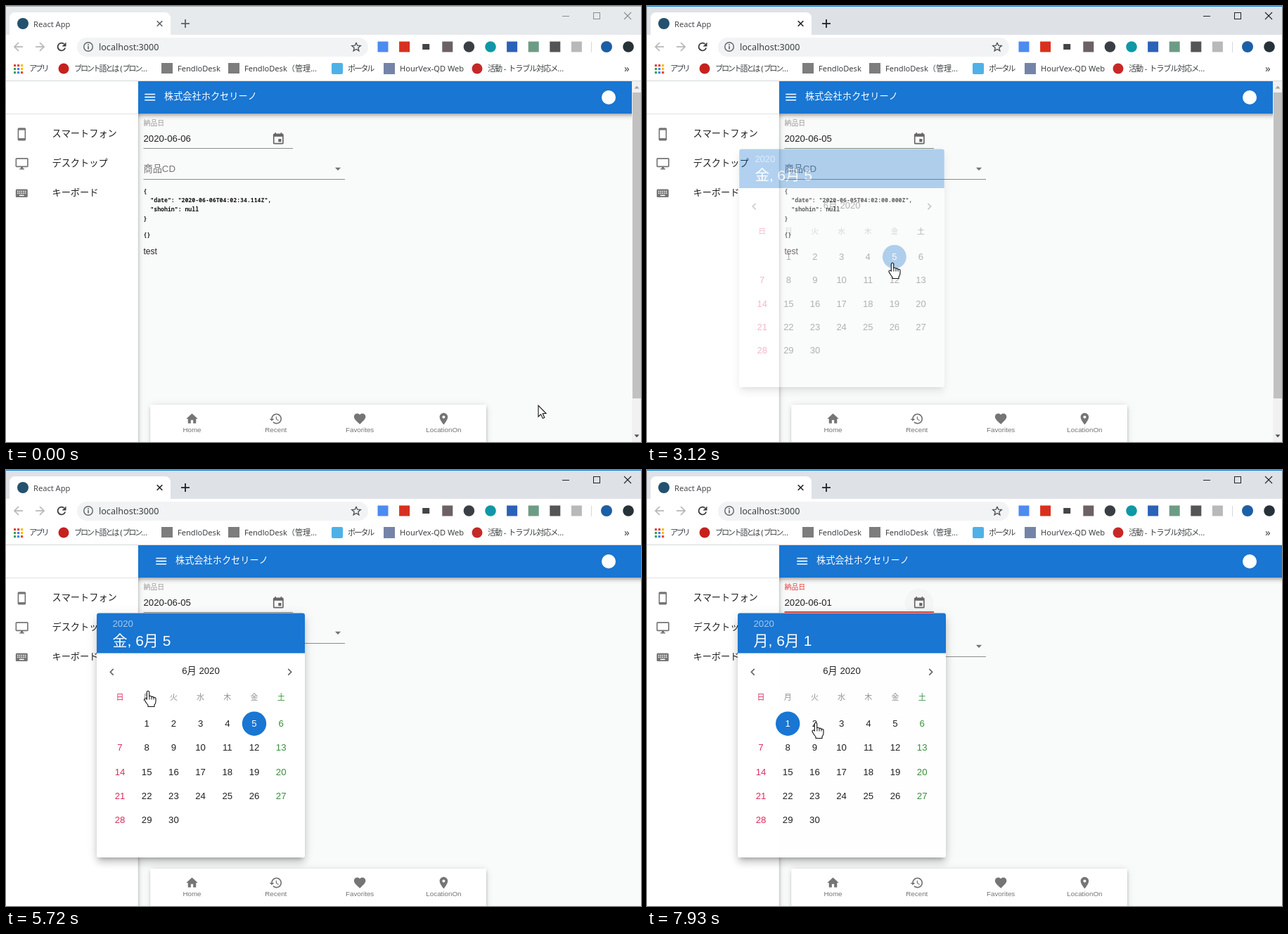
An HTML page with a canvas for the animation above (7990 ms loop, 903 by 620 pixels).

```html
<!DOCTYPE html>
<html lang="ja">
<head>
<meta charset="utf-8">
<title>React App</title>
<style>
html, body { margin: 0; width: 100%; height: 100%; overflow: hidden; background: #fff; }
canvas { display: block; }
</style>
</head>
<body>
<canvas id="stage" width="903" height="620"></canvas>
<script>
const LOOP = 7990, W = 903, H = 620, FADE = 324;
const CJK = '"Noto Sans CJK JP", "Noto Sans CJK", sans-serif';
const SANS = '"Liberation Sans", ' + CJK;
const UI = '"Noto Sans", ' + CJK;
const MONO = '"Noto Sans Mono", monospace';
const BLUE = '#1976d2', GREEN = '#388e3c', RED = '#e53935', PINK = '#dc2c5c';
const INK = '#212121', GRAY = '#757575';

// shadow layers: offset, blur, inset, alpha
const LOW = [[2, 4, 1, 0.2], [4, 5, 0, 0.14], [1, 10, 0, 0.12]];
const HIGH = [[5, 5, 3, 0.2], [8, 11, 0, 0.14], [3, 16, 0, 0.12]];

const stage = document.getElementById('stage').getContext('2d');
const sheet = document.createElement('canvas');
sheet.width = W;
sheet.height = H;
const layer = sheet.getContext('2d');
let g = stage;

const ICONS = {
  phone: 'M17 1H7c-1.1 0-2 .9-2 2v18c0 1.1.9 2 2 2h10c1.1 0 2-.9 2-2V3c0-1.1-.9-2-2-2zM17 19H7V5h10v14z',
  desktop: 'M21 2H3c-1.1 0-2 .9-2 2v12c0 1.1.9 2 2 2h7v2H8v2h8v-2h-2v-2h7c1.1 0 2-.9 2-2V4c0-1.1-.9-2-2-2zm0 14H3V4h18v12z',
  event: 'M17 12h-5v5h5v-5zM16 1v2H8V1H6v2H5c-1.1 0-2 .9-2 2v14c0 1.1.9 2 2 2h14c1.1 0 2-.9 2-2V5c0-1.1-.9-2-2-2h-1V1h-2zm3 18H5V8h14v11z',
  home: 'M10 20v-6h4v6h5v-8h3L12 3 2 12h3v8z',
  recent: 'M13 3c-4.97 0-9 4.03-9 9H1l3.9 3.9L9 12H6c0-3.87 3.13-7 7-7s7 3.13 7 7-3.13 7-7 7c-1.93 0-3.68-.79-4.94-2.06l-1.42 1.42C8.27 20 10.5 21 13 21c4.97 0 9-4.03 9-9s-4.03-9-9-9zm-1 5v5l4.28 2.54.72-1.21-3.5-2.08V8H12z',
  heart: 'M12 21.35l-1.45-1.32C5.4 15.36 2 12.28 2 8.5 2 5.42 4.42 3 7.5 3c1.74 0 3.41.81 4.5 2.09C13.09 3.81 14.76 3 16.5 3 19.58 3 22 5.42 22 8.5c0 3.78-3.4 6.86-8.55 11.54L12 21.35z',
  pin: 'M12 2C8.13 2 5 5.13 5 9c0 5.25 7 13 7 13s7-7.75 7-13c0-3.87-3.13-7-7-7zm0 9.5a2.5 2.5 0 1 1 0-5 2.5 2.5 0 0 1 0 5z',
  menu: 'M3 18h18v-2H3v2zm0-5h18v-2H3v2zm0-7v2h18V6H3z',
  drop: 'M7 10l5 5 5-5z',
  left: 'M15.4 7.4L14 6l-6 6 6 6 1.4-1.4L10.8 12z',
  right: 'M10 6L8.6 7.4 13.2 12l-4.6 4.6L10 18l6-6z'
};
for (const k in ICONS) ICONS[k] = new Path2D(ICONS[k]);

const ARROW = new Path2D('M0 0V16L3.6 12.6 6.3 18.4 8.8 17.3 6.2 11.7 11 11.4z');
const HAND = new Path2D('M-1.7 12V1.5Q0 -1 1.7 1.5V8Q3.6 6.4 5 8.5 7 7.4 8 9.5 10.4 8.6 11 11V15Q11 18 9 20V22.5H0V20.5Q-3 17-5 13-5.4 10.6-3 11z');

// time, x, y of the pointer tip
const TRACK = [
  [70, 757, 568], [550, 386, 185], [1020, 386, 186], [1180, 398, 214], [1560, 300, 320],
  [1640, 300, 320], [2120, 172, 404], [2420, 182, 402], [2500, 182, 402], [2760, 349, 365],
  [3520, 349, 365], [3840, 250, 190], [3980, 250, 190], [4300, 385, 186], [4620, 385, 186],
  [4860, 262, 276], [5260, 202, 304], [5340, 202, 304], [5480, 202, 314], [5720, 202, 314],
  [5960, 201, 364], [6180, 201, 364], [6420, 325, 277], [6740, 394, 220], [6900, 394, 220],
  [7060, 386, 183], [7620, 386, 184], [7930, 240, 359]
];
const HAND_TIMES = [[520, 1090], [1600, 3560], [4260, 4650], [4990, 6560], [7040, 7680], [7850, LOOP]];
const DIALOGS = [[1043, 2982], [4633, 6440], [7640, 99999]];

const clamp = v => Math.max(0, Math.min(1, v));
const mix = (a, b, p) => a + (b - a) * p;
const within = (t, spans) => spans.some(([a, b]) => t >= a && t < b);

// cubic-bezier(.4, 0, .2, 1)
function ease(x) {
  x = clamp(x);
  let lo = 0, hi = 1, u = x;
  for (let i = 0; i < 20; i++) {
    u = (lo + hi) / 2;
    const v = 1.2 * u * (1 - u) ** 2 + 0.6 * u * u * (1 - u) + u ** 3;
    if (v < x) lo = u; else hi = u;
  }
  return 3 * u * u * (1 - u) + u ** 3;
}

function rect(x, y, w, h, color, r = 0) {
  g.fillStyle = color;
  g.beginPath();
  g.roundRect(x, y, w, h, r);
  g.fill();
}

function disc(x, y, r, color) {
  g.fillStyle = color;
  g.beginPath();
  g.arc(x, y, r, 0, 7);
  g.fill();
}

function line(points, color, width = 1) {
  g.strokeStyle = color;
  g.lineWidth = width;
  g.beginPath();
  points.forEach(([x, y], i) => i ? g.lineTo(x, y) : g.moveTo(x, y));
  g.stroke();
}

function cross(x, y, r, color, width) {
  line([[x - r, y - r], [x + r, y + r]], color, width);
  line([[x - r, y + r], [x + r, y - r]], color, width);
}

function text(s, x, y, size, family, color, { align = 'left', weight = 400, gap = 0 } = {}) {
  g.font = `${weight} ${size}px ${family}`;
  g.fillStyle = color;
  g.textAlign = align;
  g.letterSpacing = gap + 'px';
  g.fillText(s, x, y);
}

function icon(name, x, y, color = GRAY) {
  g.save();
  g.translate(x, y);
  g.scale(0.825, 0.825);
  g.translate(-12, -12);
  g.fillStyle = color;
  g.fill(ICONS[name], 'evenodd');
  g.restore();
}

function raised(x, y, w, h, color, shadows, r = 0) {
  g.save();
  for (const [dy, blur, inset, alpha] of shadows) {
    g.shadowColor = `rgba(0,0,0,${alpha})`;
    g.shadowBlur = blur;
    g.shadowOffsetY = dy;
    rect(x + inset, y + inset, w - 2 * inset, h - 2 * inset, color, r);
  }
  g.restore();
  rect(x, y, w, h, color, r);
}

function tabStrip(active) {
  const ctl = active ? '#222' : '#8c8c8c', ink = active ? '#222' : '#5f6368';
  rect(0, 0, W, 41, active ? '#dee1e6' : '#e7eaed');
  rect(0, 0, W, 1, active ? '#1883d7' : '#aaa');
  rect(5, 9, 229, 33, '#fff', [8, 8, 0, 0]);
  disc(24, 25, 8, '#24516f');
  text('React App', 39, 30, 11.1, UI, '#45494d');
  cross(218.5, 25, 3.8, ink, 1.6);
  line([[249, 25], [261, 25]], ink, 1.8);
  line([[255, 19], [255, 31]], ink, 1.8);
  line([[791, 14.5], [801, 14.5]], ctl);
  g.strokeRect(835.5, 9.5, 9, 9);
  cross(884, 14, 5, ctl, 1.1);
}

function arrowButton(x, dir) {
  line([[x - 6 * dir, 58], [x + 6 * dir, 58]], '#b4b6b9', 1.7);
  line([[x, 52], [x + 6 * dir, 58], [x, 64]], '#b4b6b9', 1.7);
}

function toolbar() {
  rect(0, 41, W, 66, '#fff');
  arrowButton(18, -1);
  arrowButton(48, 1);
  g.strokeStyle = '#3c4043';
  g.lineWidth = 1.8;
  g.beginPath();
  g.arc(79, 58, 5.4, 0.3, 5.4);
  g.stroke();
  g.fillStyle = '#3c4043';
  g.fill(new Path2D('M85.5 51.5v6h-6z'));

  rect(101, 45, 414, 27, '#f1f3f4', 13.5);
  g.strokeStyle = '#5f6368';
  g.lineWidth = 1.4;
  g.beginPath();
  g.arc(117, 58, 6.3, 0, 7);
  g.stroke();
  rect(116.2, 57, 1.6, 4.5, '#5f6368');
  rect(116.2, 54.3, 1.6, 1.6, '#5f6368');
  text('localhost:3000', 132, 63, 12.6, UI, '#3c4043');

  const star = [];
  for (let i = 0; i <= 10; i++) {
    const a = i * Math.PI / 5 - Math.PI / 2, r = i % 2 ? 2.9 : 6.6;
    star.push([498 + r * Math.cos(a), 58.5 + r * Math.sin(a)]);
  }
  line(star, '#4a4d51', 1.3);

  const colors = ['#4c8bf0', '#d8301e', '#444', '#6c6163', '#3a3f44', '#0f97a7', '#2a62b8', '#6d9c86', '#555', '#b9b9b9'];
  const round = [4, 5];
  colors.forEach((c, i) => {
    const x = 536 + i * 30.6;
    if (round.includes(i)) disc(x, 58, 7.8, c);
    else if (i === 2) rect(x - 5, 54, 10, 8, c);
    else rect(x - 7.5, 50.5, 15, 15, c);
  });
  rect(832, 51, 1, 15, '#d5d7da');
  disc(854, 58, 8, '#1c5fa8');
  disc(885, 58, 7.8, '#263238');
}

// Letter gaps apply to Japanese runs only.
function mark(s, x, gap = 0) {
  for (const run of s.match(/[ -~]+|[^ -~]+/g)) {
    text(run, x, 93, 11.1, UI, '#3c4043', { gap: run > '~' ? gap : 0 });
    x += g.measureText(run).width;
  }
}

function bookmarks() {
  const dots = ['#ea4335', '#ea4335', '#fbbc04', '#34a853', '#4285f4', '#fbbc04', '#34a853', '#4285f4', '#ea4335'];
  dots.forEach((c, i) => rect(11 + i % 3 * 5, 83 + Math.floor(i / 3) * 5, 3.2, 3.2, c));
  mark('アプリ', 33, -2.4);
  disc(82, 89, 7.5, '#c5221f');
  mark('ブロント語とは (ブロン...', 97, -2.2);
  rect(221, 81, 16, 15, '#7d7d7d');
  mark('FendloDesk', 244);
  rect(316, 81, 16, 15, '#7d7d7d');
  mark('FendloDesk（管理...', 339);
  rect(463, 81, 16, 16, '#4db1e8', 2);
  mark('ポータル', 486, -2);
  rect(537, 81, 16, 16, '#7583a8');
  mark('HourVex-QD Web', 560);
  disc(670, 89, 7.5, '#c62828');
  mark('活動 - トラブル対応メ...', 685, -1.1);
  text('»', 879, 94, 15, UI, '#3c4043');
  rect(0, 106, W, 1, '#d5d7da');
}

function sidebar() {
  raised(0, 100, 187.5, 530, '#fff', LOW);
  rect(0, 153, 187, 1, '#e0e0e0');
  icon('phone', 22.4, 182.3);
  icon('desktop', 22.6, 224.3);
  rect(13.8, 260.5, 17, 11.5, GRAY, 1.5);
  for (let r = 0; r < 2; r++)
    for (let c = 0; c < 5; c++) rect(16 + c * 2.7, 262.8 + r * 2.6, 1.5, 1.5, '#fff');
  rect(19, 268.6, 6.6, 1.5, '#fff');
  ['スマートフォン', 'デスクトップ', 'キーボード'].forEach((s, i) =>
    text(s, 65.5, 186 + i * 42, 13.2, CJK, INK));
}

function appBar(modal) {
  const dx = modal ? 16 : 0;
  g.save();
  g.beginPath();
  g.rect(188, 107, W, 80);
  g.clip();
  raised(180, 100, W, 53, BLUE, LOW);
  g.restore();
  icon('menu', 204.7 + dx, 129.6, '#fff');
  text('株式会社ホクセリーノ', 225 + dx, 133, 13.2, CJK, '#fff', { weight: 500 });
  disc(857, 130, 10, '#fff');
}

function underline(x2, y, state) {
  const [color, h] = { error: ['#f44336', 2], hover: [INK, 2], idle: ['#8d8d8d', 1] }[state];
  rect(195.5, h > 1 ? y - 1 : y, x2 - 195.5, h, color);
}

function ripple(t) {
  for (const [a] of DIALOGS) {
    const d = t - a;
    if (d < -190 || d > 330) continue;
    const alpha = 0.12 * (1 - clamp((d - 140) / 180));
    disc(387, 189, 20.5 * ease((d + 190) / 220), `rgba(0,0,0,${alpha})`);
  }
}

function form(t, day, modal, [mx, my]) {
  const bad = day === 1, dy = bad ? 19 : 0;
  const over = (x2, y1, y2) => !modal && mx > 195 && mx < x2 && my > y1 && my < y2;
  const date = `2020-06-0${day}`;
  ripple(t);
  text('納品日', 195.5, 170, 9.9, CJK, bad ? RED : '#999');
  text(date, 195.5, 193, 13.2, SANS, INK);
  icon('event', 387.3, 189, '#666');
  underline(408, 202, bad ? 'error' : over(408, 174, 203) ? 'hover' : 'idle');
  if (bad) text('日付が不正です', 195.5, 215, 9.9, CJK, RED);

  text('商品CD', 195.5, 236 + dy, 13.2, SANS, GRAY);
  icon('drop', 472, 231.5 + dy);
  underline(482, 246 + dy, over(482, 222 + dy, 247 + dy) ? 'hover' : 'idle');

  const time = day === 6 ? '04:02:34.114Z' : '04:02:00.000Z';
  const code = (lines, y) => lines.forEach((s, i) =>
    text(s, 195.5, Math.round(y + i * 13.3) + dy, 8.2, MONO, '#111', { weight: 600 }));
  code(['{', `  "date": "${date}T${time}",`, '  "shohin": null', '}'], 265.5);
  code(bad ? ['{', '  "date": "日付が不正です"', '}'] : ['{}'], 328);
  text('test', 195.5, 353 + dy + (bad ? 27 : 0), 12, SANS, INK);
}

function bottomNav() {
  raised(205.5, 567, 477.5, 60, '#fff', LOW);
  [['home', 'Home'], ['recent', 'Recent'], ['heart', 'Favorites'], ['pin', 'LocationOn']].forEach(([name, s], i) => {
    const x = 264.5 + i * 119.3;
    icon(name, x, 587);
    text(s, x, 606, 9.8, SANS, GRAY, { align: 'center' });
  });
}

function scrollbar() {
  rect(890, 107, 13, 513, '#f1f1f1');
  rect(891, 123, 12, 435, '#c1c1c1');
  g.fillStyle = '#a3a3a3';
  g.fill(new Path2D('M893.5 117.5l3.5-4 3.5 4z'));
  g.fillStyle = '#505050';
  g.fill(new Path2D('M893.5 609.5l3.5 4 3.5-4z'));
}

function calendar(t, day, closing) {
  const names = '日月火水木金土';
  const tone = col => col === 0 ? PINK : col === 6 && !closing ? GREEN : INK;
  const main = day === 6 ? GREEN : BLUE;
  const colX = c => 162 + c * 38.2;
  raised(129, 203.5, 296, 347.5, '#fff', HIGH, 3.3);
  rect(129, 203.5, 296, 57, main, [3.3, 3.3, 0, 0]);
  text('2020', 151.5, 223, 13.2, SANS, 'rgba(255,255,255,.6)');
  text(`${names[day % 7]}, 6月 ${day}`, 151.5, 249.5, 21, SANS, '#fff', { weight: 500 });
  text('6月 2020', 277, 290, 13.2, SANS, INK, { align: 'center' });
  icon('left', 150.5, 287.3, '#666');
  icon('right', 403.5, 287.3, '#666');
  [...names].forEach((s, c) => {
    const edge = c % 6 === 0;
    text(s, colX(c), 327, 11, CJK, edge ? tone(c) : '#929292', { align: 'center', weight: edge ? 500 : 400 });
  });
  for (let d = 1; d <= 30; d++) {
    const x = colX(d % 7), y = 360.7 + Math.floor(d / 7) * 34.3;
    if (d === day) disc(x, y, 17.2, main);
    const pressed = d === 5 ? t - 2800 : d === 1 ? t - 6170 : -1;
    if (d !== day && pressed > 0 && pressed < 300)
      disc(x, y, 16 * ease(pressed / 200), 'rgba(0,0,0,.28)');
    text(d, x, Math.round(y + 4.4), 13.2, SANS, d === day ? '#fff' : tone(d % 7), { align: 'center' });
  }
}

function dialog(t, day) {
  const span = DIALOGS.find(([a, b]) => t >= a && t < b + FADE);
  if (!span) return;
  const p = (t - span[0]) / FADE, q = (t - span[1]) / FADE;
  const closing = q > 0;
  const alpha = closing ? 1 - ease(q) : ease(p);
  const grown = closing ? 1 - ease((q - 0.333) / 0.666) : ease(p / 0.666);
  g = layer;
  g.clearRect(0, 0, W, H);
  g.save();
  g.translate(277, 203.5);
  g.scale(mix(0.75, 1, grown), mix(0.5625, 1, grown));
  g.translate(-277, -203.5);
  calendar(t, day, closing);
  g.restore();
  g = stage;
  g.globalAlpha = alpha;
  g.drawImage(sheet, 0, 0);
  g.globalAlpha = 1;
}

function pointerAt(t) {
  const i = TRACK.findIndex(k => k[0] > t);
  if (i === 0) return TRACK[0].slice(1);
  if (i < 0) return TRACK[TRACK.length - 1].slice(1);
  const [a, x1, y1] = TRACK[i - 1], [b, x2, y2] = TRACK[i];
  const u = (t - a) / (b - a), p = u * u * (3 - 2 * u);
  return [mix(x1, x2, p), mix(y1, y2, p)];
}

function pointer(t, [x, y]) {
  const shape = within(t, HAND_TIMES) ? HAND : ARROW;
  g.save();
  g.translate(Math.round(x), Math.round(y));
  g.fillStyle = '#fff';
  g.fill(shape);
  g.strokeStyle = '#111';
  g.lineWidth = 1.1;
  g.stroke(shape);
  if (shape === HAND)
    for (const k of [1.9, 5, 8]) line([[k, 9], [k, 12.5]], '#111');
  g.restore();
}

function draw(t) {
  const day = t < DIALOGS[0][1] ? 6 : t < DIALOGS[1][1] ? 5 : 1;
  const modal = within(t, DIALOGS);
  const tip = pointerAt(t);
  g.clearRect(0, 0, W, H);
  tabStrip(t >= 850);
  toolbar();
  bookmarks();
  g.save();
  g.beginPath();
  g.rect(0, 107, W, 513);
  g.clip();
  rect(0, 107, W, 513, '#f9fafa');
  sidebar();
  appBar(modal);
  form(t, day, modal, tip);
  bottomNav();
  if (!modal) scrollbar();
  dialog(t, day);
  g.restore();
  pointer(t, tip);
}

const start = performance.now();
function tick() {
  draw((performance.now() - start) % LOOP);
  requestAnimationFrame(tick);
}
tick();
</script>
</body>
</html>
```
